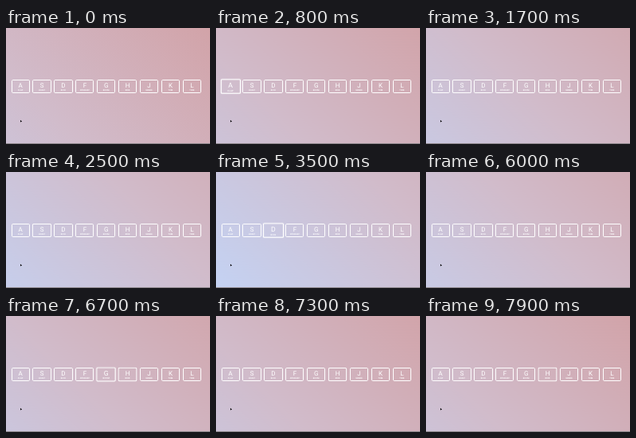
Write an HTML page that moves like this. It is 256 by 146 pixels and loops after 8 s.

```html
<!DOCTYPE html>
<html lang="en">
<head>
<meta charset="utf-8">
<title>Drum keys</title>
<style>
  html, body { margin: 0; width: 100%; height: 100%; overflow: hidden; }
  #stage { position: relative; width: 256px; height: 146px; overflow: hidden; }
  #sky {
    position: absolute; left: 0; top: 0; width: 520px; height: 146px;
    background: linear-gradient(45deg, rgb(196,211,244) 0, rgb(209,188,203) 237px, rgb(210,160,164) 484px);
  }
  svg { position: absolute; left: 0; top: 0; }
  .key { transform-box: fill-box; transform-origin: center; }
  .key rect { fill: none; stroke: #fff; stroke-width: 1; }
  .key .glow { stroke-width: 2; opacity: 0; }
  text {
    fill: #fff; text-anchor: middle; text-rendering: geometricPrecision;
    font-family: Roboto, "Liberation Sans", sans-serif;
  }
  .letter { font-size: 8px; font-weight: 400; }
  .sound { font-size: 2.5px; font-weight: 700; letter-spacing: .15px; }
</style>
</head>
<body>
<div id="stage">
  <div id="sky"></div>
  <svg width="256" height="146" viewBox="0 0 256 146">
    <g id="keys"></g>
    <path d="M18 115.7v3l.8-.7h1.4z" fill="#000"/>
    <rect y="145" width="256" height="1" fill="#8e878c"/>
  </svg>
</div>
<script>
const LOOP = 8000;
const SOUNDS = {
  A: 'CLAP', S: 'HIHAT', D: 'KICK', F: 'OPENHAT', G: 'BOOM',
  H: 'RIDE', J: 'SNARE', K: 'TOM', L: 'TINK'
};
// Each press: start, fully grown, release, back at rest (ms)
const PRESSES = {
  A: [[350, 700, 850, 1280]],
  S: [[1650, 2000, 2150, 2580]],
  D: [[2850, 3200, 3450, 3820]],
  F: [[4150, 4480, 4650, 4950]],
  G: [[5970, 6350, 6560, 6900]],
  H: [[6560, 6900, 7000, 7380], [7430, 7700, 7780, 8000]]
};

const timing = { duration: LOOP, iterations: Infinity };

function add(parent, tag, attrs, text = '') {
  const el = document.createElementNS('http://www.w3.org/2000/svg', tag);
  for (const name in attrs) el.setAttribute(name, attrs[name]);
  el.textContent = text;
  return parent.appendChild(el);
}

function pulse(el, presses, rest, full) {
  const steps = presses.flatMap(times => times.map((ms, i) => ({
    ...(i === 1 || i === 2 ? full : rest),
    offset: ms / LOOP,
    easing: i % 2 ? 'linear' : 'ease-in-out'
  })));
  el.animate([{ ...rest, offset: 0 }, ...steps, { ...rest, offset: 1 }], timing);
}

const keys = document.getElementById('keys');
Object.entries(SOUNDS).forEach(([letter, sound], i) => {
  // Edges snap to whole pixels so the one-pixel frame stays crisp
  const edge = 6.55 + i * 26.9;
  const left = Math.round(edge), right = Math.round(edge + 23.2);
  const box = { x: left + .5, y: 65.5, width: right - left - 1, height: 16, rx: 1.2 };
  const middle = edge + 11.6;
  const key = add(keys, 'g', { class: 'key' });
  const glow = add(key, 'rect', { ...box, class: 'glow' });
  add(key, 'rect', box);
  add(key, 'text', { x: middle, y: 75, class: 'letter' }, letter);
  add(key, 'text', { x: middle, y: 79, class: 'sound' }, sound);
  const presses = PRESSES[letter];
  if (presses) {
    pulse(key, presses, { transform: 'scale(1)' }, { transform: 'scale(1.1)' });
    pulse(glow, presses, { opacity: 0 }, { opacity: .25 });
  }
});

document.getElementById('sky').animate([
  { transform: 'translateX(-245px)', offset: 0, easing: 'ease-in-out' },
  { transform: 'translateX(0)', offset: .495, easing: 'ease-in-out' },
  { transform: 'translateX(-238px)', offset: 1 }
], timing);
</script>
</body>
</html>
```
